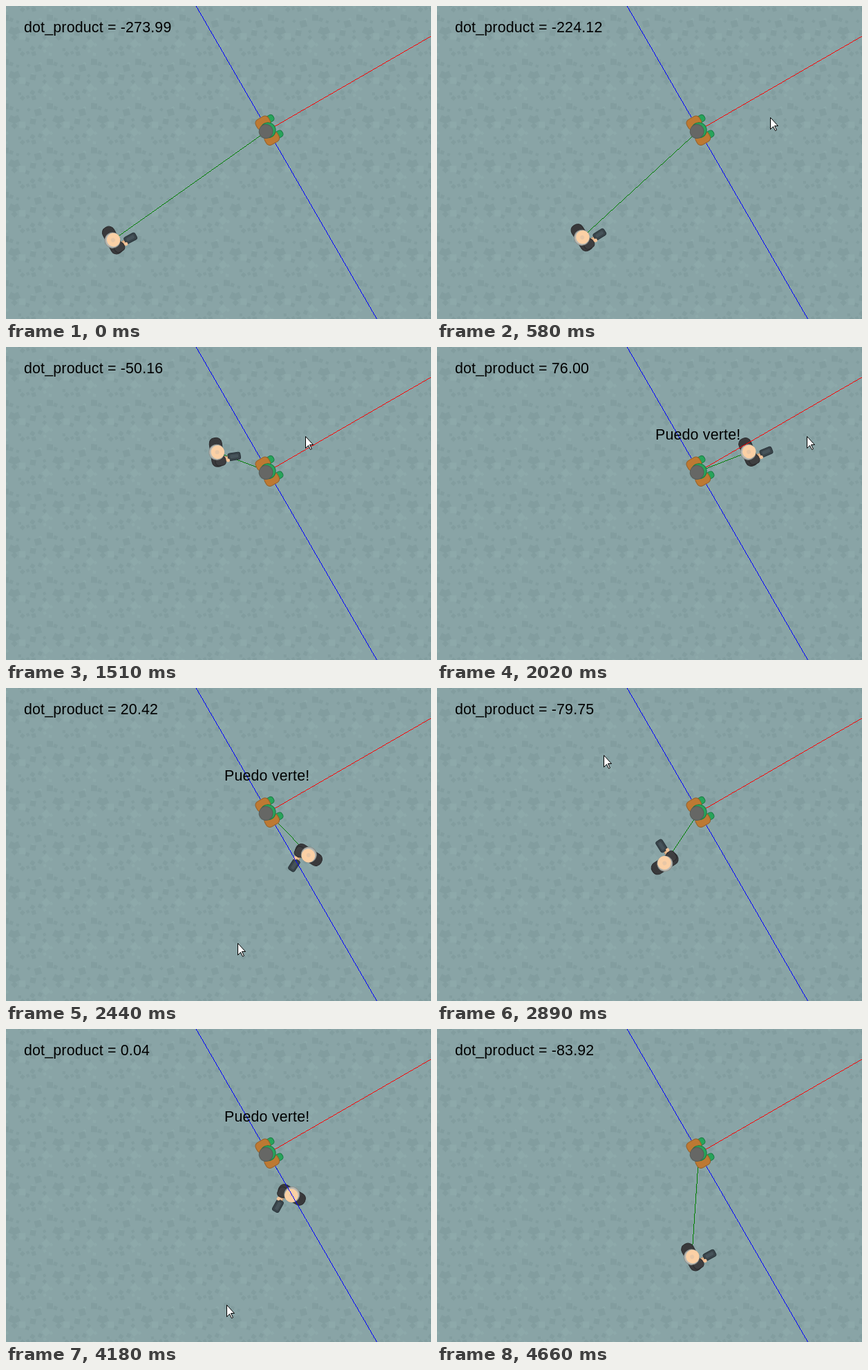
Animation of 615x453 px, one loop 4690 ms. Source, as an HTML page with a canvas:

```html
<!DOCTYPE html>
<html lang="es">
<head>
<meta charset="utf-8">
<style>
html, body { margin: 0; width: 100%; height: 100%; overflow: hidden; background: #89a4a6; }
canvas { display: block; }
</style>
</head>
<body>
<canvas id="stage" width="615" height="453"></canvas>
<script>
const W = 615, H = 453, LOOP = 4690, STEP = 30, FIRST = 100, CURSOR_GONE = 4620, AIM_LAG = 30;
const ctx = document.getElementById('stage').getContext('2d');
const enemy = { x: 379, y: 180, angle: -Math.PI / 6 };
const look = { x: Math.cos(enemy.angle), y: Math.sin(enemy.angle) };

// Way points: time, x, y
const walk = [
  [250, 154.422, 339], [970, 272.132, 321], [1150, 286, 268], [1690, 328, 113],
  [2020, 450.591, 152], [2500, 430, 250], [2890, 329.636, 254], [3310, 324, 136],
  [3520, 350.375, 110], [3850, 428, 155], [4180, 413.629, 239.9], [4660, 368.7, 330]
];
const mouse = [
  [130, 606, 95], [610, 475, 165], [970, 405, 194], [1690, 454, 112], [2020, 535, 129],
  [2230, 484, 339], [2450, 330, 366], [2800, 245, 150], [2890, 241, 97], [3310, 370, 50],
  [3520, 496, 61], [3690, 585, 150], [3850, 505, 330], [4180, 319, 399],
  [4390, 390, 417], [4600, 583, 215]
];

// Smooth curve through the way points.
function along(path, time) {
  const last = path.length - 1;
  const t = Math.min(Math.max(time, path[0][0]), path[last][0]);
  let i = 0;
  while (i < last - 1 && path[i + 1][0] <= t) i++;
  const a = path[i], b = path[i + 1];
  const before = path[Math.max(0, i - 1)], after = path[Math.min(last, i + 2)];
  const span = b[0] - a[0], u = (t - a[0]) / span;
  const slope = (p, q, k) => (q[k] - p[k]) / (q[0] - p[0]) * span;
  const axis = k => {
    const ease = u * u * (3 - 2 * u);
    return a[k] + (b[k] - a[k]) * ease
      + slope(before, b, k) * u * (1 - u) ** 2
      - slope(a, after, k) * u * u * (1 - u);
  };
  return { x: axis(1), y: axis(2) };
}

function seeded(seed) {
  return () => (seed = seed * 16807 % 2147483647) / 2147483647;
}

function makeGround() {
  const size = 64, cells = 5, cell = size / cells;
  const tile = document.createElement('canvas');
  tile.width = tile.height = size;
  const g = tile.getContext('2d'), random = seeded(11);
  g.fillStyle = '#89a4a6';
  g.fillRect(0, 0, size, size);
  for (let i = 0; i < cells * cells; i++) {
    const x = (i % cells + random()) * cell, y = (Math.floor(i / cells) + random()) * cell;
    const side = 4 + 6 * random() ** 2, turn = random() * Math.PI / 2;
    g.fillStyle = i % 4 ? '#829d9f' : '#8da9aa';
    for (const ox of [-size, 0, size]) for (const oy of [-size, 0, size]) {
      g.save();
      g.translate(x + ox, y + oy);
      g.rotate(turn);
      g.fillRect(-side / 2, -side / 2, side, side);
      g.restore();
    }
  }
  return ctx.createPattern(tile, 'repeat');
}
const ground = makeGround();

// Hard-edged one-pixel line, sampled at pixel centres.
function line(x0, y0, x1, y1, color) {
  const dx = x1 - x0, dy = y1 - y0, steep = Math.abs(dy) > Math.abs(dx);
  const from = Math.floor(steep ? Math.min(y0, y1) : Math.min(x0, x1));
  const to = Math.floor(steep ? Math.max(y0, y1) : Math.max(x0, x1));
  ctx.fillStyle = color;
  for (let i = from; i < to; i++) {
    if (steep) ctx.fillRect(Math.floor(x0 + (i + 0.5 - y0) * dx / dy), i, 1, 1);
    else ctx.fillRect(i, Math.floor(y0 + (i + 0.5 - x0) * dy / dx), 1, 1);
  }
}

function box(x, y, w, h, r, fill, edge) {
  ctx.beginPath();
  ctx.roundRect(x, y, w, h, r);
  ctx.fillStyle = fill;
  ctx.fill();
  if (!edge) return;
  ctx.strokeStyle = edge;
  ctx.lineWidth = 1;
  ctx.stroke();
}

function disc(x, y, r, fill, edge) {
  box(x - r, y - r, 2 * r, 2 * r, r, fill, edge);
}

function posed(x, y, angle, draw) {
  ctx.save();
  ctx.translate(x, y);
  ctx.rotate(angle);
  draw();
  ctx.restore();
}

function drawPlayer() {
  box(7, 8, 11, 7, 3, '#e8b98e', '#b58c69');
  box(-9, -21, 18, 42, 8, '#39393b', '#2b2b2d');
  box(-4, 7, 15, 13, 5, '#3e3e40', '#2b2b2d');
  box(15, 4.5, 18, 10.5, 3, '#39444a', '#29343a');
  box(18, 7, 12, 5, 1.5, '#46535a');
  disc(14.5, 14, 2.5, '#f3c49a');
  disc(-0.3, 0, 11, '#b9b9b3', '#8c918e');
  disc(1.3, 0, 9.8, '#fbd0a5');
  disc(0.5, 0, 3, '#e9c7a6');
}

function drawEnemy() {
  for (const side of [-1, 1]) {
    box(7, side * 13 - 5, 12, 10, 4, '#27a45b', '#1c7944');
    box(-9, side * 13 - 8, 21, 16, 6, '#bd7933', '#94602b');
  }
  box(-8, -13, 13, 26, 4, '#bd7933');
  disc(2.5, 0, 11, '#27a45b', '#1c7944');
  disc(-1, 0, 10, '#666765', '#555b56');
}

function drawCursor({ x, y }) {
  const shape = [[0, 0], [0, 17], [4, 13], [7, 19], [9, 18], [6, 12], [11, 12]];
  ctx.beginPath();
  for (const [dx, dy] of shape) ctx.lineTo(Math.round(x) + dx + 0.5, Math.round(y) + dy + 0.5);
  ctx.closePath();
  ctx.fillStyle = '#fff';
  ctx.fill();
  ctx.strokeStyle = '#000';
  ctx.lineWidth = 1;
  ctx.stroke();
}

function render(time) {
  const t = time < FIRST ? 0 : FIRST + Math.floor((time - FIRST) / STEP) * STEP;
  const player = along(walk, t), aim = along(mouse, t - AIM_LAG);
  const facing = Math.atan2(aim.y - player.y, aim.x - player.x);
  const dot = (player.x - enemy.x) * look.x + (player.y - enemy.y) * look.y;

  ctx.fillStyle = ground;
  ctx.fillRect(0, 0, W, H);

  line(enemy.x, enemy.y, player.x, player.y, '#008000');
  posed(player.x, player.y, facing, drawPlayer);
  line(enemy.x, enemy.y, enemy.x + look.x * 300, enemy.y + look.y * 300, '#f00');
  line(enemy.x + look.y * 400, enemy.y - look.x * 400,
       enemy.x - look.y * 400, enemy.y + look.x * 400, '#00f');
  posed(377, 181, enemy.angle, drawEnemy);

  ctx.font = '21.33px "Liberation Sans", Arial, sans-serif';
  ctx.letterSpacing = '0.2px';
  ctx.fillStyle = '#000';
  ctx.fillText('dot_product = ' + dot.toFixed(2), 26, 38);
  if (dot > 0) ctx.fillText('Puedo verte!', 316, 134);

  if (t >= FIRST && t < CURSOR_GONE) drawCursor(along(mouse, t));
}

const start = performance.now();
function tick() {
  render((performance.now() - start) % LOOP);
  requestAnimationFrame(tick);
}
tick();
</script>
</body>
</html>
```
